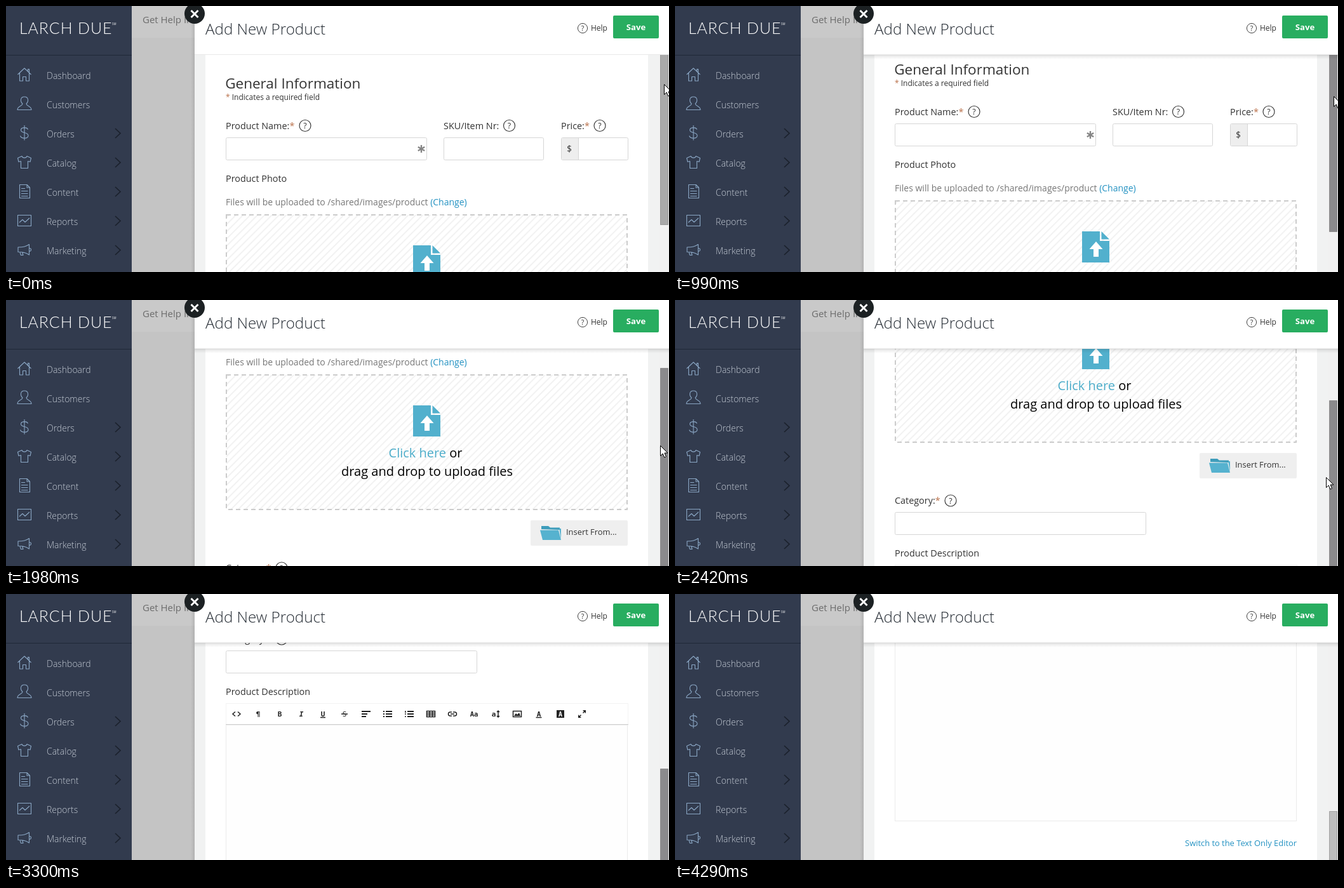
Recreate the animation shown at these times as an HTML page. Size 1044 by 419 pixels, loop 4730 ms.

```html
<!DOCTYPE html>
<html lang="en">
<head>
<meta charset="utf-8">
<title>Add New Product</title>
<style>
  html, body { margin: 0; width: 100%; height: 100%; overflow: hidden; background: #fff; }
  svg { display: block; width: 1044px; height: 419px; font-family: "Open Sans", sans-serif; }
  .label { font-size: 14.4px; fill: #333; }
  .link { fill: #2492c2; }
  .star { fill: #b9704a; }
  .box { fill: #fff; stroke: #d6d6d6; }
  .line { fill: none; stroke: #8aa6c4; stroke-width: 1.1; stroke-linejoin: round; }
  .nav { font-size: 14px; font-weight: 300; fill: #c3cad4; }
  .tool { font: bold 11px "DejaVu Sans Mono", monospace; fill: #222; text-anchor: middle; }
  .ink { fill: none; stroke: #222; stroke-width: 1.5; }
  .bars { fill: none; stroke: #222; stroke-width: 2; }
</style>
</head>
<body>
<svg viewBox="0 0 1044 419">
  <defs>
    <pattern id="hatch" width="8" height="8" patternUnits="userSpaceOnUse" patternTransform="rotate(45)">
      <rect width="8" height="8" fill="#fff"/>
      <rect width="1.7" height="8" fill="#f0f0f0"/>
    </pattern>
    <linearGradient id="fade" x2="0" y2="1">
      <stop offset="0" stop-color="#000" stop-opacity=".17"/>
      <stop offset=".4" stop-color="#000" stop-opacity=".07"/>
      <stop offset="1" stop-color="#000" stop-opacity="0"/>
    </linearGradient>
    <linearGradient id="edge">
      <stop offset="0" stop-color="#000" stop-opacity="0"/>
      <stop offset="1" stop-color="#000" stop-opacity=".1"/>
    </linearGradient>
    <clipPath id="view"><rect x="297" y="77" width="747" height="342"/></clipPath>
    <g id="help">
      <circle r="9" fill="#fff" stroke="#3a3a3a" stroke-width="1.2"/>
      <text y="4.6" font-size="12.5" text-anchor="middle" fill="#333">?</text>
    </g>
  </defs>

  <!-- dimmed page -->
  <rect x="198" width="100" height="419" fill="#c4c4c4"/>
  <rect x="198" width="100" height="50" fill="#c9c9c9"/>
  <text x="215" y="27" font-size="15" fill="#6c6c6c">Get Help In</text>
  <rect x="291" width="6" height="419" fill="url(#edge)"/>

  <!-- sidebar -->
  <rect width="198" height="419" fill="#323b4e"/>
  <rect y="77" width="198" height="1" fill="#202838"/>
  <text x="21" y="44" font-size="25" fill="#fff" letter-spacing=".9" style="font-family:Lato,sans-serif;font-weight:300">LARCH DUE</text>
  <text x="167" y="30" font-size="4.5" fill="#fff">SM</text>
  <g id="nav"></g>
  <g class="line">
    <path d="M18.500 108L29 98L39.500 108M21.500 105.500V118H26.500V111.500H31.500V118H36.500V105.500M34.500 103V99.500H36.500V105"/>
    <path d="M26 154C22 150 22.500 143 29 143S36 150 32 154C32 158 40 157 40 163.500H18C18 157 26 158 26 154Z"/>
    <path d="M34.500 194.500C33 190.500 23.500 190.500 23.500 195.500C23.500 201 35 198 35 204C35 209.500 24 209.500 22.500 204.500M29 188V211.500"/>
    <path d="M25 236.500C26 240 32 240 33 236.500L39.500 239.500L38 245.500L34.500 244.500V255.500H23.500V244.500L20 245.500L18.500 239.500Z"/>
    <path d="M21.500 281.500H33L37.500 286V302.500H21.500ZM33 281.500V286H37.500M24 287.500H30M24 291.500H34.500M24 295.500H34.500M24 299.500H34.500"/>
    <path d="M18.500 329.500H39.500V346.500H18.500ZM21 341L26 336.500L30 340.500L37 334"/>
    <path d="M36.500 375.500V392C31 388.500 28 387.500 19 387.500V380C28 380 31 379 36.500 375.500ZM36.500 381.500Q39.500 381.500 39.500 384T36.500 386M22 388L23.500 392.500H27L25.500 388"/>
  </g>

  <!-- scrolling form -->
  <rect x="297" width="747" height="419" fill="#f1f2f2"/>
  <g clip-path="url(#view)">
    <rect x="314" y="77" width="697" height="342" fill="#fff"/>
    <g id="form">
      <text x="345.200" y="130" font-size="22.500" fill="#333">General Information</text>
      <text x="346" y="148" font-size="12" fill="#333"><tspan class="star">*</tspan> Indicates a required field</text>

      <text x="346" y="194" class="label">Product Name:<tspan class="star">*</tspan></text>
      <text x="689" y="194" class="label">SKU/Item Nr:</text>
      <text x="874" y="194" class="label">Price:<tspan class="star">*</tspan></text>
      <use href="#help" x="471" y="188.500"/>
      <use href="#help" x="792.500" y="188.500"/>
      <use href="#help" x="935" y="188.500"/>
      <rect class="box" x="346.500" y="207.500" width="316" height="35" rx="2"/>
      <path d="M654 219V231M648.800 222L659.200 228M648.800 228L659.200 222" stroke="#858585" stroke-width="2.400"/>
      <rect class="box" x="689.500" y="207.500" width="157" height="35" rx="2"/>
      <rect class="box" x="874.500" y="207.500" width="105" height="35" rx="2"/>
      <path d="M875 208H901V242H875Z" fill="#eee"/>
      <path d="M901.500 208V242" stroke="#d6d6d6"/>
      <text x="883" y="230" font-size="14" fill="#333">$</text>

      <text x="346" y="277" class="label">Product Photo</text>
      <text x="346" y="314" font-size="14" fill="#777">Files will be uploaded to /shared/images/product <tspan class="link">(Change)</tspan></text>

      <rect x="347" y="329" width="631" height="212" fill="url(#hatch)" stroke="#ccc" stroke-width="2" stroke-dasharray="7 5"/>
      <path d="M641 377H669V392H684V426H641ZM671.500 377L684 389.500H671.500Z" fill="#52b0cd"/>
      <path d="M663 393L673.500 405H667V417H659V405H652.500Z" fill="#fff"/>
      <text x="660.500" y="459" font-size="20" text-anchor="middle"><tspan fill="#4bacc9">Click here</tspan> or</text>
      <text x="663" y="488" font-size="20" text-anchor="middle">drag and drop to upload files</text>

      <rect x="826" y="558" width="153" height="40" rx="2" fill="#efefef"/>
      <path d="M843 572V567H854L857 569.500H872V573" fill="#3e9dbb"/>
      <path d="M841 573.500H870L874 589H845ZM871.500 573.500V571H874V587Z" fill="#56b2cf"/>
      <text x="882" y="581" font-size="12.900" fill="#333">Insert From...</text>

      <text x="346" y="638" class="label">Category:<tspan class="star">*</tspan></text>
      <use href="#help" x="434" y="633"/>
      <rect class="box" x="346.500" y="651.500" width="395" height="35" rx="2"/>

      <text x="346" y="721" class="label">Product Description</text>
      <rect x="346.500" y="734.500" width="632" height="326" fill="#fefefe" stroke="#ebebeb"/>
      <rect x="346.500" y="734.500" width="633" height="33" fill="#fff" stroke="#f3f3f3"/>
      <rect x="346" y="767" width="634" height="1" fill="#cdcdcd"/>
      <rect x="346" y="768" width="634" height="1" fill="#efefef"/>
      <g id="tools" transform="translate(363 751)"></g>
      <text x="979" y="1100" font-size="12.900" text-anchor="end" class="link">Switch to the Text Only Editor</text>
    </g>
    <rect x="1029" y="77" width="15" height="342" fill="#f1f1f1"/>
    <rect id="thumb" x="1030.500" width="12" height="338" stroke="#000" stroke-opacity=".25"/>
  </g>

  <!-- header -->
  <rect id="shadow" x="297" y="76" width="747" height="8" fill="url(#fade)"/>
  <rect x="297" width="747" height="76" fill="#fff"/>
  <rect x="297" y="76" width="747" height="1" fill="#e9e9e9"/>
  <text x="314" y="45" font-size="24.200" font-weight="300" fill="#262d35">Add New Product</text>
  <circle cx="908" cy="35" r="7.600" fill="none" stroke="#444"/>
  <text x="908" y="39" font-size="10.500" text-anchor="middle" fill="#333">?</text>
  <text x="921" y="39" font-size="12" fill="#333">Help</text>
  <rect x="956" y="15" width="72" height="36" rx="2" fill="#28ad60"/>
  <text x="992" y="38" font-size="13.200" font-weight="700" text-anchor="middle" fill="#fff">Save</text>
  <circle cx="297" cy="12" r="16" fill="#1c2123"/>
  <path d="M291.500 7L302.500 18M302.500 7L291.500 18" stroke="#fff" stroke-width="3"/>

  <path id="cursor" d="M.5 .5V16.500L4.200 13L6.800 19L9.500 17.800L7 12H12Z" fill="#fff" stroke="#000"/>
</svg>

<script>
  const $ = id => document.getElementById(id);

  // Sidebar entries; the later ones open a submenu.
  $('nav').innerHTML = ['Dashboard', 'Customers', 'Orders', 'Catalog', 'Content', 'Reports', 'Marketing']
    .map((name, i) => {
      const y = 115 + i * 46;
      const chevron = i < 2 ? '' :
        `<path d="M172 ${y - 14}l8 7.500l-8 7.500" fill="none" stroke="#1b212c" stroke-width="1.700"/>`;
      return `<text class="nav" x="64" y="${y}">${name}</text>${chevron}`;
    }).join('');

  // Editor buttons, each drawn around its own centre.
  const glyph = (text, style = '') => `<text class="tool" y="4" style="${style}">${text}</text>`;
  const ink = (d, kind = 'ink') => `<path class="${kind}" d="${d}"/>`;
  const tools = [
    ink('M-2 -3.500L-6 0L-2 3.500M2 -3.500L6 0L2 3.500'),
    glyph('¶'),
    glyph('B'),
    glyph('I', 'font-style:italic'),
    glyph('U') + ink('M-4 5.500H4'),
    glyph('S', 'font-weight:400') + ink('M-5 0H5'),
    ink('M-7 -4H7M-7 0H2M-7 4H0', 'bars'),
    ink('M-7 -4H-5M-7 0H-5M-7 4H-5M-3 -4H7M-3 0H7M-3 4H7', 'bars'),
    ink('M-6 -5V-2M-7 0H-5M-7 4H-5') + ink('M-3 -4H7M-3 0H7M-3 4H7', 'bars'),
    ink('M-6.500 -4.500H6.500V4.500H-6.500ZM-6.500 -1.500H6.500M-6.500 1.500H6.500M-2 -4.500V4.500M2.500 -4.500V4.500'),
    ink('M-1 -3H-3.500A3 3 0 0 0 -3.500 3H-1M1 -3H3.500A3 3 0 0 1 3.500 3H1M-3 0H3'),
    glyph('Aa', 'font-size:10.500px'),
    `<g transform="translate(-3)">${glyph('a')}</g>` + ink('M4 -5V5M2 -3L4 -5L6 -3M2 3L4 5L6 3'),
    ink('M-6.500 -4.500H6.500V4.500H-6.500Z') + '<path d="M-5 3L-2 -1L0 1L3 -2L5 3Z" fill="#222"/>',
    glyph('A') + ink('M-4.500 5.500H4.500'),
    '<rect x="-6" y="-6" width="12" height="12" fill="#222"/>' + glyph('A', 'fill:#fff;font-size:10px'),
    ink('M1.500 -1.500L4 -4M-1.500 1.500L-4 4') + '<path d="M1 -6H6V-1ZM-1 6H-6V1Z" fill="#222"/>'
  ];
  $('tools').innerHTML = tools.map((icon, i) => `<g transform="translate(${i * 34})">${icon}</g>`).join('');

  const LOOP = 4730, STEP = 110;
  // Rows of [time, value...], linear in between.
  const scrollKeys = [[660, 0], [770, 2], [880, 8], [990, 22], [1430, 104], [1980, 211], [2420, 317], [3300, 562], [3740, 703]];
  const cursorKeys = [[550, 1036, 123], [660, 1036, 131], [770, 1037, 133], [990, 1037, 142], [1430, 1029, 180],
    [1980, 1030, 229], [2420, 1025, 279], [2860, 1029, 328], [3190, 1040, 382], [3300, 1046, 398]];

  function sample(keys, t) {
    if (t <= keys[0][0]) return keys[0].slice(1);
    const next = keys.findIndex(key => key[0] > t);
    if (next < 0) return keys[keys.length - 1].slice(1);
    const [a, b] = [keys[next - 1], keys[next]];
    const k = (t - a[0]) / (b[0] - a[0]);
    return a.slice(1).map((v, i) => v + (b[i + 1] - v) * k);
  }

  function thumbColor(t) {
    if (t < 660) return '#a9a9a9';
    if (t < 4180) return '#8b8a8c';
    return t < 4290 ? '#a9a9a9' : '#bdbdbd';
  }

  function draw(time) {
    const t = Math.floor(time % LOOP / STEP) * STEP;
    const scroll = Math.round(sample(scrollKeys, t)[0]);
    const [x, y] = sample(cursorKeys, t).map(Math.round);
    $('form').setAttribute('transform', `translate(0 ${-scroll})`);
    $('thumb').setAttribute('y', Math.round(6 + scroll * 0.478) + 0.5);
    $('thumb').setAttribute('fill', thumbColor(t));
    $('shadow').setAttribute('opacity', Math.min(1, scroll / 20));
    $('cursor').setAttribute('transform', `translate(${x} ${y})`);
  }

  const start = performance.now();
  function tick() {
    draw(performance.now() - start);
    requestAnimationFrame(tick);
  }
  tick();
</script>
</body>
</html>
```
